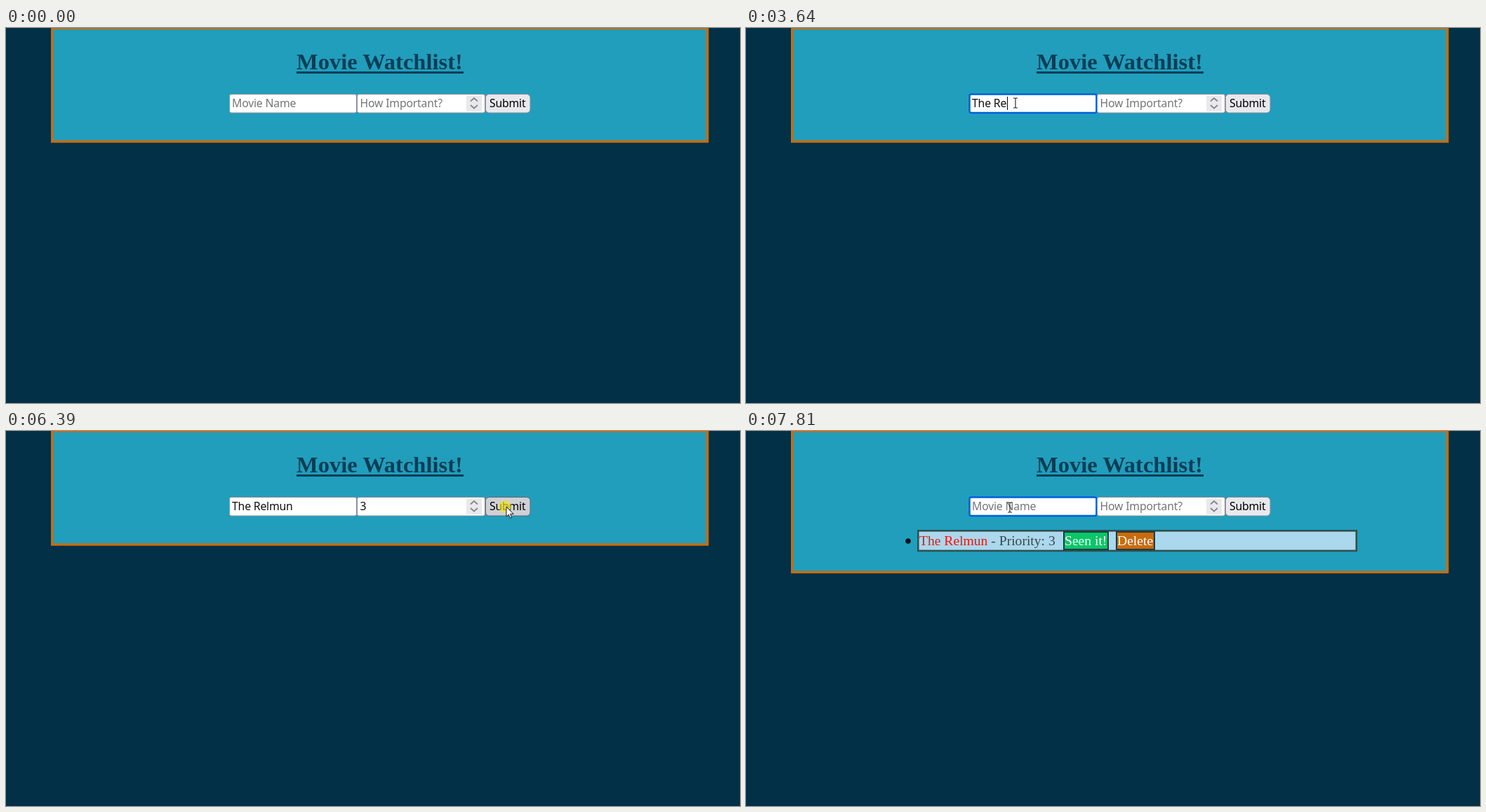
These frames come from a looping animation (1046x535 px, 8000 ms). An HTML page:

```html
<!DOCTYPE html>
<html lang="en">
<head>
<meta charset="utf-8">
<title>Movie Watchlist</title>
<style>
  html, body { margin: 0; width: 100%; height: 100%; overflow: hidden; background: #023047; }
  svg { display: block; }
  text { white-space: pre; }
  .ui { font: 15.8px "Noto Sans", "Open Sans", sans-serif; letter-spacing: -.2px; }
  .serif { font: 19.6px "Liberation Serif", "Times New Roman", serif; }
  .title { font: bold 32.5px "Liberation Serif", "Times New Roman", serif; fill: #083d56; }
  .field { fill: #fff; stroke: #8f8f9d; }
  .hover { stroke: #676774; }
  .focus { stroke: #0060df; stroke-width: 2.6; }
  .tag { stroke: #1f3b40; stroke-width: 2; }
  .chevron { fill: none; stroke: #85858b; stroke-width: 1.7; }
</style>
</head>
<body>
<svg width="1046" height="535" viewBox="0 0 1046 535">
  <rect id="panel" x="65.7" y=".2" width="934" height="161.8" fill="#219ebc" stroke="#ca6c0c" stroke-width="3.4"/>
  <text class="title" x="414" y="58.5">Movie Watchlist!</text>
  <rect x="414" y="62" width="238" height="3" fill="#083d56"/>

  <rect id="nameBox" class="field" x="318.5" y="94.5" width="181" height="26.5" rx="2.5"/>
  <rect id="rankBox" class="field" x="500.5" y="94.5" width="182" height="26.5" rx="2.5"/>
  <rect x="656" y="96.5" width="22" height="22.5" rx="1" fill="#e9e9ed"/>
  <path class="chevron" d="M662 104.5l5-4.5 5 4.5M662 110l5 4.5 5-4.5"/>
  <rect id="button" x="683.5" y="94.5" width="63.5" height="26.5" rx="5"/>
  <text id="nameText" class="ui" x="322" y="113"></text>
  <text id="rankText" class="ui" x="504.5" y="113"></text>
  <text class="ui" x="689" y="113">Submit</text>
  <rect id="caret" y="98" width="1" height="19"/>

  <g id="entry" class="serif">
    <circle cx="231" cy="157" r="3.8" fill="#06141c"/>
    <rect x="245.3" y="142.3" width="624.6" height="28.6" fill="#abd8ed" stroke="#2f4f4f" stroke-width="2.6"/>
    <text x="247" y="163" fill="#3b4747"><tspan id="entryName" fill="#fa1208"></tspan> - Priority: 3</text>
    <rect class="tag" x="453" y="144" width="63" height="25" fill="#07c768"/>
    <text x="454" y="163" fill="#fff">Seen it!</text>
    <rect class="tag" x="528" y="144" width="54" height="25" fill="#ca6c0c"/>
    <text x="529" y="163" fill="#fff">Delete</text>
  </g>

  <circle id="flash" r="9" fill="#f4e51c" opacity=".68"/>
  <path id="arrow" d="M0 0V14.2L3.3 11.2 5.5 16.2 7.7 15.2 5.6 10.4H10.2Z" fill="#fff" stroke="#16181a" stroke-width="1"/>
  <path id="beam" d="M-3-7H-1L0-6 1-7H3M0-6V6M-3 7H-1L0 6 1 7H3" fill="none" stroke="#222" stroke-width="1.1"/>
</svg>
<script>
const LOOP = 8000, TICK = 68, BLINK = 530;
const MOVIE = 'The Relmun';
const KEYS = [2970, 3040, 3110, 3240, 3440, 3640, 3840, 3910, 4100, 4170];
const CLICKS = [1290, 6390, 7280];
const TAB = 4360, RANK_KEY = 5440, ADDED = 6740;
const [CLICK_NAME, CLICK_SUBMIT, CLICK_AGAIN] = CLICKS;
const CARET_RESETS = [...CLICKS, ...KEYS, TAB, RANK_KEY].sort((a, b) => a - b);

// Pointer waypoints: time, x, y
const PATH = [
  [70, 911, 457], [270, 700, 330], [410, 505, 210], [550, 412, 148],
  [690, 388, 114], [760, 385, 109], [890, 384, 107], [5020, 384, 107],
  [5230, 540, 106], [5380, 697, 105], [5440, 712, 104], [5660, 713, 108],
  [6460, 713, 108], [6600, 610, 114], [6670, 493, 118], [6740, 369, 124],
  [6880, 352, 123], [7020, 368, 113], [7150, 376, 109], [LOOP, 376, 109]
];

const parts = {};
for (const el of document.querySelectorAll('[id]')) parts[el.id] = el;
parts.entryName.textContent = MOVIE;

const show = (el, on) => el.setAttribute('visibility', on ? 'visible' : 'hidden');
const place = (el, p) => el.setAttribute('transform', `translate(${p.x} ${p.y})`);
const within = (p, left, right) => p.x >= left && p.x < right && p.y >= 94 && p.y < 122;

// The pointer is held between ticks, as in a screen recording.
function pointerAt(t) {
  const i = PATH.findIndex(p => p[0] > t);
  if (i === 0) return { x: -50, y: -50 };
  const [t0, x0, y0] = PATH[i - 1], [t1, x1, y1] = PATH[i];
  const k = Math.min(1, Math.floor((t - t0) / TICK + .05) * TICK / (t1 - t0));
  return { x: Math.round(x0 + (x1 - x0) * k), y: Math.round(y0 + (y1 - y0) * k) };
}

function focusAt(t) {
  if (t < CLICK_NAME) return '';
  if (t < TAB) return 'name';
  if (t < CLICK_SUBMIT) return 'rank';
  return t < CLICK_AGAIN ? '' : 'name';
}

function fill(el, value, placeholder) {
  el.textContent = value || placeholder;
  el.setAttribute('fill', value ? '#111' : '#757579');
}

function render(t) {
  const added = t >= ADDED;
  const pointer = pointerAt(t);
  const focus = focusAt(t);
  const name = added ? '' : MOVIE.slice(0, KEYS.filter(k => k <= t).length);
  const rank = !added && t >= RANK_KEY ? '3' : '';

  fill(parts.nameText, name, 'Movie Name');
  fill(parts.rankText, rank, 'How Important?');
  parts.panel.setAttribute('height', added ? 201.2 : 161.8);
  show(parts.entry, added);

  const overName = within(pointer, 318, 500), overRank = within(pointer, 500, 683);
  const state = (id, over) => 'field' + (focus === id ? ' focus' : over ? ' hover' : '');
  parts.nameBox.setAttribute('class', state('name', overName));
  parts.rankBox.setAttribute('class', state('rank', overRank));

  const lit = within(pointer, 683, 748) || (t >= CLICK_SUBMIT && !added);
  parts.button.setAttribute('fill', lit ? '#d0d0d7' : '#e9e9ed');
  parts.button.setAttribute('stroke', lit ? '#676774' : '#8f8f9d');

  const reset = CARET_RESETS.filter(k => k <= t).pop();
  show(parts.caret, focus && Math.floor((t - reset) / BLINK) % 2 === 0);
  const [label, value, left] = focus === 'rank'
    ? [parts.rankText, rank, 505] : [parts.nameText, name, 323];
  parts.caret.setAttribute('x', Math.round(left + (value ? label.getComputedTextLength() : 0)));

  const beam = within(pointer, 318, 656);
  show(parts.beam, beam);
  show(parts.arrow, !beam);
  place(parts.beam, pointer);
  place(parts.arrow, pointer);
  place(parts.flash, { x: pointer.x - 2, y: pointer.y });
  show(parts.flash, CLICKS.some(c => t >= c && t < c + 70));
}

const start = performance.now();
function frame() {
  render((performance.now() - start) % LOOP);
  requestAnimationFrame(frame);
}
frame();
</script>
</body>
</html>
```
